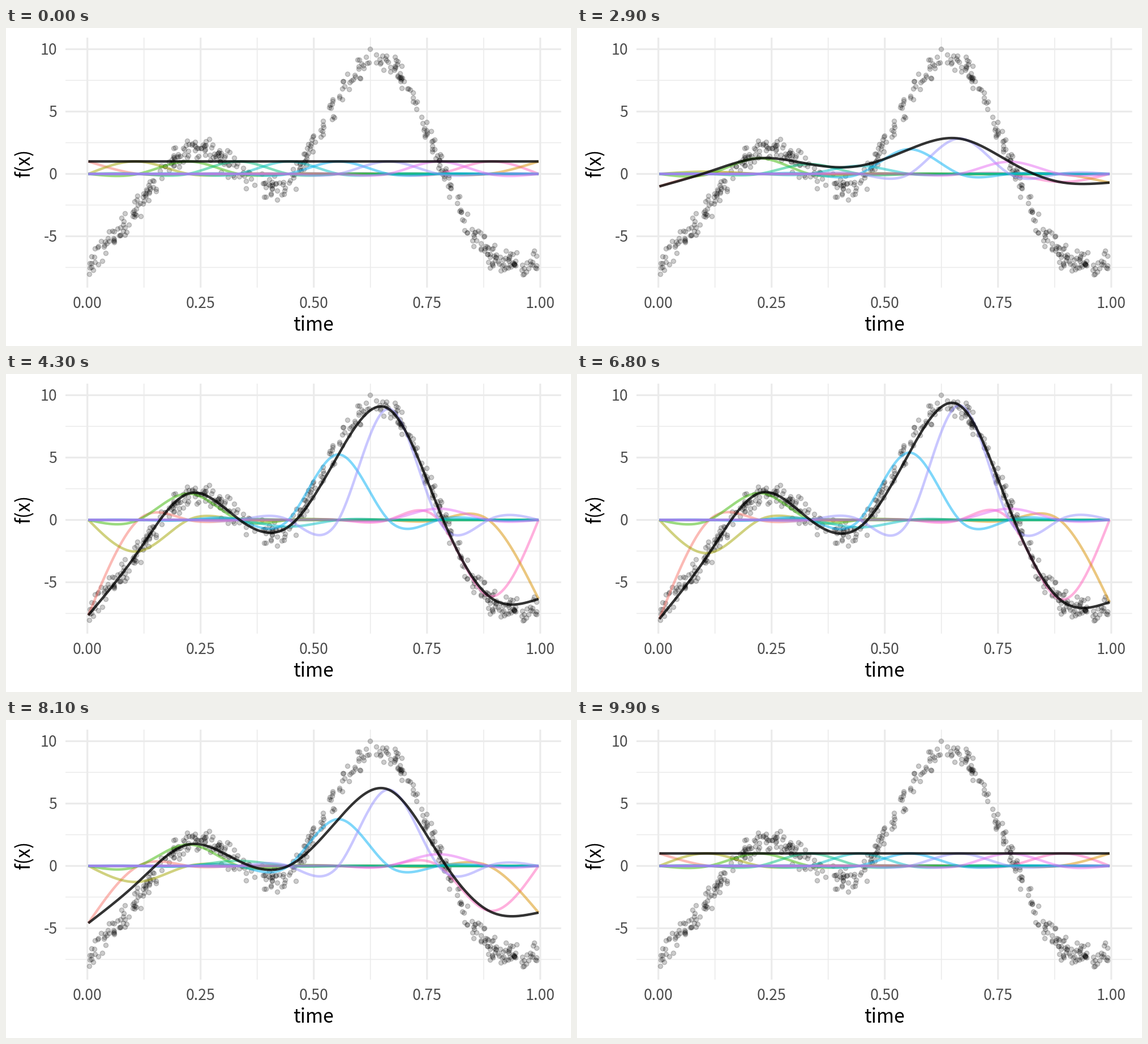
A matplotlib script that plays this animation: 998 by 561 pixels, repeating every 10000 ms.

```python
import numpy as np
import matplotlib.pyplot as plt
from matplotlib.animation import FuncAnimation

W, H, DPI = 998, 561, 64
PT = 72 / DPI  # points per pixel
FRAMES = 100
DOTS = 470

plt.rcParams["font.family"] = "Noto Sans CJK JP"


def px(x):
    return 143.7 + 800 * np.asarray(x)


def py(y):
    return 257.4 - 22 * np.asarray(y)


def cardinal_splines(knots, x):
    """Natural cubic splines on even knots: each is 1 at its own knot only."""
    n, h = len(knots), knots[1] - knots[0]
    e = np.eye(n)
    bend, rhs = np.eye(n), np.zeros((n, n))
    for i in range(1, n - 1):
        bend[i, i - 1:i + 2] = 1, 4, 1
        rhs[i, i - 1:i + 2] = 6, -12, 6
    m = np.linalg.solve(bend, rhs)
    pos = (x - knots[0]) / h
    i = np.clip(pos.astype(int), 0, n - 2)
    u = (pos - i)[:, None]
    v = 1 - u
    return (v * e[i] + u * e[i + 1]
            + (v**3 - v) / 6 * m[i] + (u**3 - u) / 6 * m[i + 1])


def cubic_in_out(u):
    return 4 * u**3 if u < 0.5 else 1 - 4 * (1 - u)**3


def progress(i):
    """0 is the plain basis, 1 the weighted one."""
    if i < 50:
        return cubic_in_out(max(0, (i - 16) / 34))
    return 1 - cubic_in_out(max(0, (i - 66) / 33))


fig = plt.figure(figsize=(W / DPI, H / DPI), dpi=DPI, facecolor="white")
ax = fig.add_axes([0, 0, 1, 1])
ax.set(xlim=(0, W), ylim=(H, 0))
ax.set_axis_off()

# Grid
LEFT, RIGHT, TOP, BOTTOM = 105, 980.5, 17, 458


def grid(xs, ys, width):
    style = dict(color="#ebebeb", lw=width * PT, snap=False,
                 solid_capstyle="butt", zorder=1)
    for x in px(xs):
        ax.plot([x, x], [TOP, BOTTOM], **style)
    for y in py(ys):
        ax.plot([LEFT, RIGHT], [y, y], **style)


x_ticks = np.arange(0, 1.01, 0.25)
y_ticks = np.arange(-5, 11, 5)
grid(x_ticks[:-1] + 0.125, y_ticks - 2.5, 1.6)
grid(x_ticks, y_ticks, 3.2)

# Labels
tick = dict(size=26.7 * PT, color="#4d4d4d", va="baseline")
title = dict(size=33.7 * PT, color="black", ha="center", va="baseline")
for x in x_ticks:
    ax.text(px(x), 493.5, f"{x:.2f}", ha="center", **tick)
for y in y_ticks:
    ax.text(90.5, py(y) + 9.3, f"{y}", ha="right", **tick)
ax.text(543, 534, "time", **title)
ax.text(42, 238, "f(x)", rotation=90, rotation_mode="anchor", **title)

# Scatter: a smooth trend with noise
knots = np.linspace(0.0022, 0.9962, 10)
trend = [-7.5, -2.5, 2, 0.3, -0.6, 5.9, 9, 1.1, -6.2, -7]
rng = np.random.default_rng(12)
dot_x = rng.uniform(knots[0], knots[-1], DOTS)
noise = np.clip(rng.normal(0, 0.53, DOTS), -1.2, 0.9)
dot_y = cardinal_splines(knots, dot_x) @ trend + noise
shade = (0, 0, 0, 0.2)
ax.scatter(px(dot_x), py(dot_y), s=(8.1 * PT)**2, facecolors=[shade],
           edgecolors=[shade], linewidths=1.47 * PT, zorder=2)

# Basis functions and their sum
weights = np.array([-7.95, -2.65, 2.15, 0.05, -0.6, 5.4, 9.2, 0.9,
                    -6.35, -6.6])
colors = ["#f8766d", "#a3a500", "#39b600", "#00bf7d", "#00bfc4",
          "#00b0f6", "#9590ff", "#e76bf3", "#ff62bc", "#d89000"]
stacking = [0, 8, 9, *range(1, 8)]
t = np.linspace(knots[0], knots[-1], 320)
basis = cardinal_splines(knots, t)


def curve(color, alpha, z):
    return ax.plot(px(t), py(0 * t), color=color, alpha=alpha, lw=4.45 * PT,
                   solid_capstyle="butt", solid_joinstyle="round",
                   snap=False, zorder=z)[0]


parts = [curve(c, 0.5, 3 + stacking.index(k)) for k, c in enumerate(colors)]
total = curve("black", 0.8, 20)


def draw(i):
    terms = basis * (1 + (weights - 1) * progress(i))
    for line, term in zip(parts, terms.T):
        line.set_ydata(py(term))
    total.set_ydata(py(terms.sum(axis=1)))
    return [*parts, total]


anim = FuncAnimation(fig, draw, frames=FRAMES, interval=100, repeat=True,
                     repeat_delay=0)
plt.show()
```
